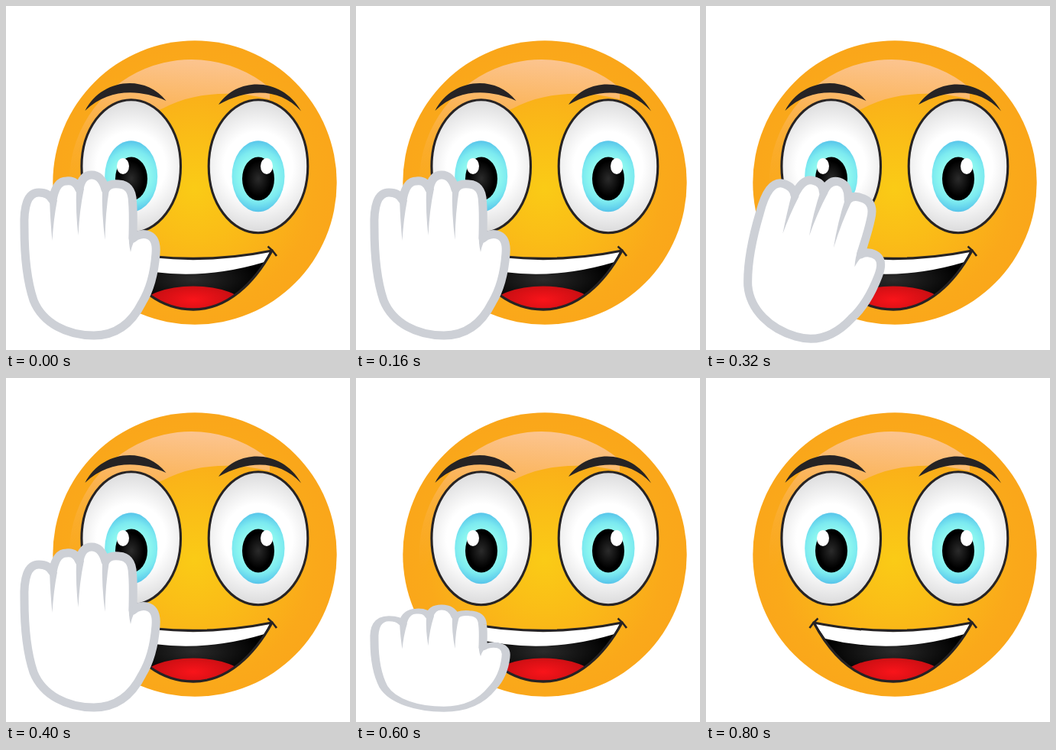
Animation of 450x450 px, one loop 2.8 s. Source, as an HTML page:

```html
<!DOCTYPE html>
<html lang="en">
<head>
<meta charset="utf-8">
<title>Waving smiley</title>
<style>
  html, body { margin: 0; width: 100%; height: 100%; overflow: hidden; background: #fff; }
  svg { display: block; width: 100vw; height: 100vh; }
</style>
</head>
<body>
<svg viewBox="0 0 450 450">
  <defs>
    <radialGradient id="skin" cx=".5" cy=".52" r=".52">
      <stop offset="0" stop-color="#facb16"/>
      <stop offset=".35" stop-color="#fabd17"/>
      <stop offset=".8" stop-color="#faa91a"/>
      <stop offset="1" stop-color="#faa61a"/>
    </radialGradient>
    <linearGradient id="shine" x1=".55" y1="0" x2=".45" y2="1">
      <stop offset="0" stop-color="#fcc48e"/>
      <stop offset=".3" stop-color="#fbb660"/>
      <stop offset=".6" stop-color="#fbb03c" stop-opacity=".6"/>
      <stop offset="1" stop-color="#faac2a" stop-opacity="0"/>
    </linearGradient>
    <radialGradient id="white" gradientUnits="userSpaceOnUse" cx="0" cy="0" r="90">
      <stop offset=".5" stop-color="#fff"/>
      <stop offset="1" stop-color="#d8d8d9"/>
    </radialGradient>
    <radialGradient id="iris" gradientUnits="userSpaceOnUse" cx="0" cy="13" r="47">
      <stop offset=".45" stop-color="#93fbf0"/>
      <stop offset=".72" stop-color="#7ceaf0"/>
      <stop offset="1" stop-color="#55c3ea"/>
    </radialGradient>
    <radialGradient id="dark">
      <stop offset="0" stop-color="#2b2b2b"/>
      <stop offset=".8" stop-color="#000"/>
    </radialGradient>
    <radialGradient id="tongue" cx=".5" cy=".35" r=".5">
      <stop offset="0" stop-color="#f9141a"/>
      <stop offset="1" stop-color="#c00d11"/>
    </radialGradient>
    <path id="lips" d="M141 320Q245 341 348 320C325 362 290 397 245 397C198 397 165 365 141 320Z"/>
    <clipPath id="inside"><use href="#lips"/></clipPath>
    <g id="eye">
      <ellipse rx="64.8" ry="87" fill="url(#white)" stroke="#262324" stroke-width="3.1"/>
      <ellipse cy="13" rx="34.5" ry="46.5" fill="url(#iris)"/>
    </g>
  </defs>

  <rect width="450" height="450" fill="#fff"/>
  <circle cx="247" cy="231" r="185.7" fill="url(#skin)"/>
  <path d="M345 107A160 160 0 0 0 86 262C105 200 160 150 205 134C245 112 300 110 345 122Z" fill="url(#shine)"/>

  <use href="#eye" x="163.7" y="209.7"/>
  <use href="#eye" x="330" y="209.7"/>
  <g fill="url(#dark)">
    <ellipse cx="164" cy="226" rx="21" ry="28.5"/>
    <ellipse cx="330" cy="226" rx="21" ry="28.5"/>
  </g>
  <g fill="#fff">
    <ellipse cx="153" cy="209.5" rx="8" ry="10.5"/>
    <ellipse cx="341" cy="209.5" rx="8" ry="10.5"/>
  </g>
  <g fill="#262324">
    <path d="M103.500 137C123 97 180 87 209.500 124C175 109 135 107 103.500 137Z"/>
    <path d="M278 129C304 91 362 94 386 137.500C358 107 318 107 278 129Z"/>
  </g>

  <g clip-path="url(#inside)">
    <rect x="135" y="315" width="220" height="85" fill="url(#dark)"/>
    <ellipse cx="245" cy="392" rx="66" ry="25.5" fill="url(#tongue)"/>
    <path d="M139 316L348 316L338 335Q245 363 156 341Z" fill="#fff"/>
  </g>
  <g fill="none" stroke="#262324" stroke-width="3.3" stroke-linejoin="round">
    <use href="#lips"/>
    <path d="M135.500 327Q140 320 146.500 314.500M354 327Q349 319.500 342.500 314.500" stroke-width="2.6"/>
  </g>

  <g id="hand">
    <path fill="#fff" stroke="#cdd0d6" stroke-width="11" stroke-linejoin="round"
      d="M24 290C23 262 28 244 43 244C53 244 58 248 61 254C64 236 70 229 79 229C88 228 93 232 96 240
         C98 226 104 221 112 221C121 221 127 228 130 240C133 234 140 232 148 233C160 234 165 242 165.500 256
         C167 272 166 290 166 304C171 299 180 297 187 300C194 303 197 312 196 324C194 350 189 370 178 388
         C165 414 145 431 115 431C80 431 48 415 36 385C27 358 24 320 24 290Z"/>
    <path fill="#cdd0d6" d="M57 252L67 254Q62 280 60.500 307Q58 282 57 252ZM92 238L102 239Q96 268 94.500 300Q91 270 92 238Z
      M126 238L135 240Q130 270 129.500 306Q125 272 126 238ZM161 298L171 303Q165 310 163 322Q160 310 161 298Z"/>
  </g>
</svg>
<script>
  const LOOP = 2800, STEP = 40;
  const WAVE_END = 480, LEAVE = 600, GONE = 800;
  const swing = [0, 8, 16.5, 16.5, 0, -8];
  const hand = document.getElementById('hand');

  function draw(time) {
    const step = Math.floor(time / STEP);
    hand.style.display = time < GONE ? '' : 'none';
    if (time < LEAVE) {
      const angle = time < WAVE_END ? swing[step % swing.length] : 0;
      hand.setAttribute('transform', `rotate(${angle} 112 440)`);
    } else {
      // Squash onto the base of the palm, then slide out of the corner.
      const k = step - LEAVE / STEP;
      hand.setAttribute('transform', `translate(${-35 * k} ${437 + 30 * k}) scale(1 .634) translate(0 -437)`);
    }
  }

  const start = performance.now();
  function tick() {
    draw((performance.now() - start) % LOOP);
    requestAnimationFrame(tick);
  }
  tick();
</script>
</body>
</html>
```
